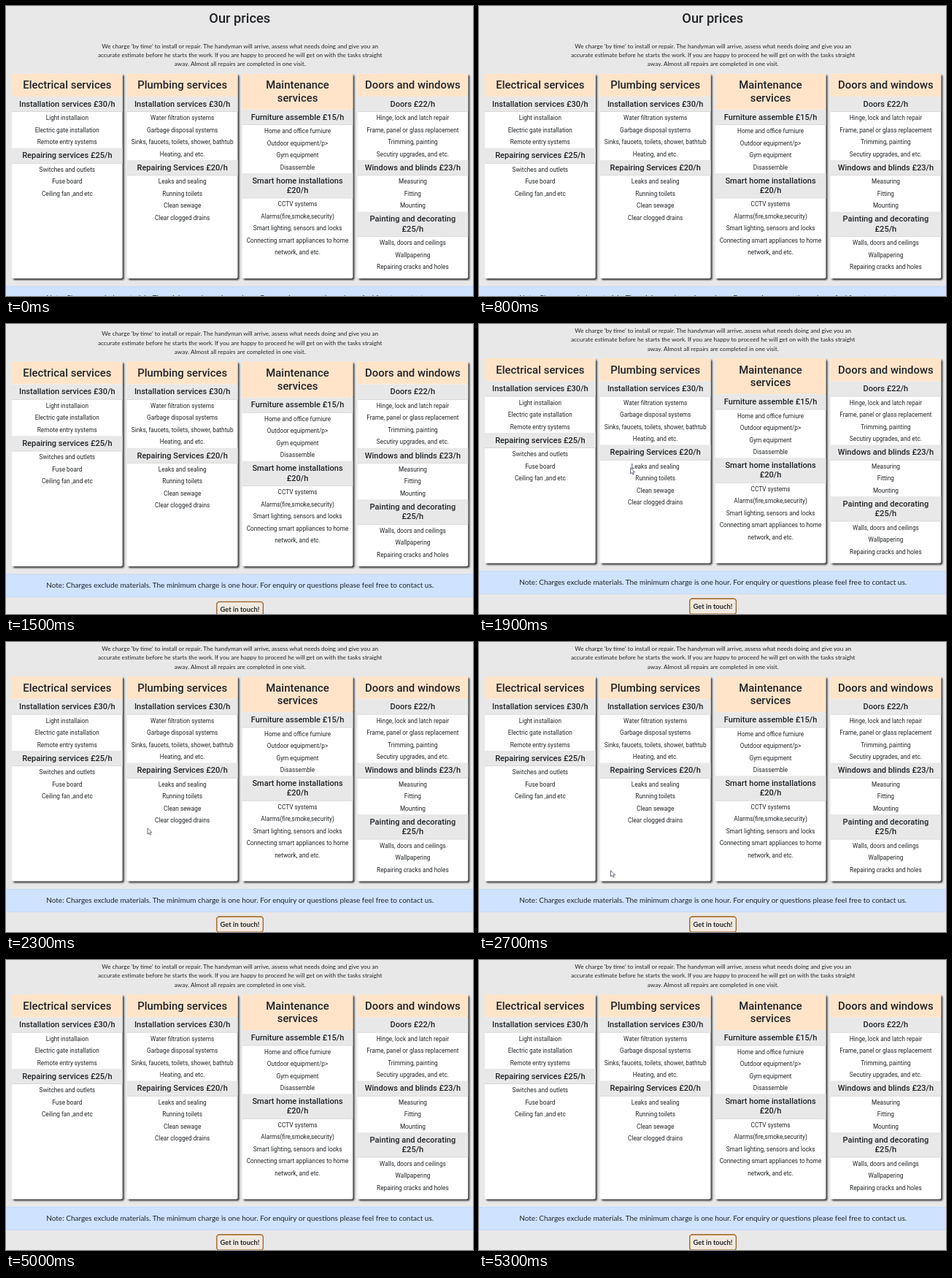
Recreate the animation shown at these times as an HTML page. Size 640 by 397 pixels, loop 6200 ms.

```html
<!DOCTYPE html>
<html lang="en">
<head>
<meta charset="utf-8">
<title>Our prices</title>
<style>
html, body { margin: 0; width: 100%; height: 100%; overflow: hidden; background: #e8e8e8; }
svg { display: block; width: 640px; height: 397px; }
text { text-anchor: middle; fill: #212529; font-family: Lato, sans-serif; }
.title, .head, .sub, .item { font-family: Roboto, sans-serif; }
.title { font-size: 18.3px; font-weight: 500; }
.head { font-size: 14.9px; font-weight: 500; }
.sub { font-size: 11.05px; font-weight: 500; }
.item { font-size: 8.27px; }
.intro { font-size: 8.2px; }
.note { font-size: 10px; }
.button { font-size: 9.35px; font-weight: 700; }
.card { filter: drop-shadow(2px 2px 1.2px rgba(0, 0, 0, .8)); }
</style>
</head>
<body>
<svg viewBox="0 0 640 397">
  <rect width="640" height="397" fill="#e8e8e8"/>
  <g id="page"></g>
  <path id="cursor" d="M0 0V8.2L2 6.5L3.4 9.4L4.7 8.8L3.4 6H6Z" fill="#fff" stroke="#444b60" stroke-width=".8"/>
</svg>
<script>
const LOOP = 6200, STEP = 100;
const PAGE_TOP = -.4, SCROLL = 45.6;
const CARD = { top: 93, bottom: 373.4, left: 8, width: 151.7, pitch: 157.85 };
const ROW = 16.5;

const intro = [
  "We charge 'by time' to install or repair. The handyman will arrive, assess what needs doing and give you an",
  "accurate estimate before he starts the work. If you are happy to proceed he will get on with the tasks straight",
  "away. Almost all repairs are completed in one visit."
];

const cards = [
  { head: ["Electrical services"], groups: [
    [["Installation services £30/h"], ["Light installaion", "Electric gate installation", "Remote entry systems"]],
    [["Repairing services £25/h"], ["Switches and outlets", "Fuse board", "Ceiling fan ,and etc"]]
  ] },
  { head: ["Plumbing services"], groups: [
    [["Installation services £30/h"], ["Water filtration systems", "Garbage disposal systems",
      "Sinks, faucets, toilets, shower, bathtub", "Heating, and etc."]],
    [["Repairing Services £20/h"], ["Leaks and sealing", "Running toilets", "Clean sewage", "Clear clogged drains"]]
  ] },
  { head: ["Maintenance", "services"], groups: [
    [["Furniture assemble £15/h"], ["Home and office furniure", "Outdoor equipment/p>", "Gym equipment", "Disassemble"]],
    [["Smart home installations", "£20/h"], ["CCTV systems", "Alarms(fire,smoke,security)",
      "Smart lighting, sensors and locks", "Connecting smart appliances to home", "network, and etc."]]
  ] },
  { head: ["Doors and windows"], groups: [
    [["Doors £22/h"], ["Hinge, lock and latch repair", "Frame, panel or glass replacement",
      "Trimming, painting", "Secutiry upgrades, and etc."]],
    [["Windows and blinds £23/h"], ["Measuring", "Fitting", "Mounting"]],
    [["Painting and decorating", "£25/h"], ["Walls, doors and ceilings", "Wallpapering", "Repairing cracks and holes"]]
  ] }
];

const page = document.getElementById("page");
const cursor = document.getElementById("cursor");

function add(parent, tag, attrs, content = "") {
  const el = document.createElementNS("http://www.w3.org/2000/svg", tag);
  for (const key in attrs) el.setAttribute(key, attrs[key]);
  el.textContent = content;
  return parent.appendChild(el);
}

function rect(parent, x, y, width, height, fill, extra = {}) {
  return add(parent, "rect", { x, y, width, height, fill, ...extra });
}

function lines(parent, list, x, y, gap, name) {
  list.forEach((line, i) => add(parent, "text", { x, y: y + i * gap, class: name }, line));
}

function drawCard({ head, groups }, index) {
  const { left, width, pitch, top, bottom } = CARD;
  const x = left + index * pitch, mid = x + width / 2;
  const card = add(page, "g", {});
  rect(card, x, top, width, bottom - top, "#fff", { rx: 2, class: "card" });

  let y = top;
  const headHeight = 13.4 + head.length * 17.9;
  rect(card, x, y, width, headHeight, "#ffe4c9", { rx: 2 });
  lines(card, head, mid, y + 20.5, 17.9, "head");
  y += headHeight;

  for (const [sub, items] of groups) {
    const subHeight = 7.9 + sub.length * 13.2;
    rect(card, x, y, width, subHeight, "#e8e8e8");
    rect(card, x, y + subHeight - .6, width, .6, "#cfcfcf");
    lines(card, sub, mid, y + 13.9, 13.2, "sub");
    y += subHeight;
    lines(card, items, mid, y + 11.2, ROW, "item");
    y += items.length * ROW;
  }
}

function build() {
  lines(page, ["Our prices"], 320.3, 23.1, 0, "title");
  lines(page, intro, 320.7, 58, 12.4, "intro");
  cards.forEach(drawCard);

  rect(page, -1, 384.3, 642, 31, "#cfe2ff", { stroke: "#b6d4fe", "stroke-width": .6 });
  lines(page, ["Note: Charges exclude materials. The minimum charge is one hour. " +
    "For enquiry or questions please feel free to contact us."], 320.7, 403.2, 0, "note");

  const box = [288.8, 422, 63.6, 21.2];
  rect(page, ...box, "#f1e9df", { rx: 3.5, stroke: "#c27a30", "stroke-width": 1.3 });
  rect(page, ...box, "none", { rx: 3.5, stroke: "#4a3420", "stroke-width": .8, "stroke-dasharray": "1 1" });
  lines(page, ["Get in touch!"], 320.5, 436, 0, "button");
}

function scrollAt(t) {
  const p = Math.min(1, Math.max(0, (t - 1000) / 700));
  return SCROLL * (1 - Math.pow(1 - p, 1.886));
}

function cursorAt(t) {
  const mix = (a, b, p) => a + (b - a) * p;
  if (t < 2700) {
    const p = (t - 1900) / 800;
    return [mix(207.5, 180.5, p), mix(196.8, 312.8, p)];
  }
  const p = (t - 2700) / 500;
  return [mix(180.5, 163, p), mix(312.8, 392, p)];
}

function render(time) {
  const t = Math.floor((time % LOOP) / STEP) * STEP;
  page.setAttribute("transform", `translate(0 ${PAGE_TOP - scrollAt(t)})`);
  const shown = t >= 1900 && t < 3300;
  cursor.style.display = shown ? "" : "none";
  if (shown) cursor.setAttribute("transform", `translate(${cursorAt(t)})`);
}

build();
const start = performance.now();
function tick() {
  render(performance.now() - start);
  requestAnimationFrame(tick);
}
tick();
</script>
</body>
</html>
```
